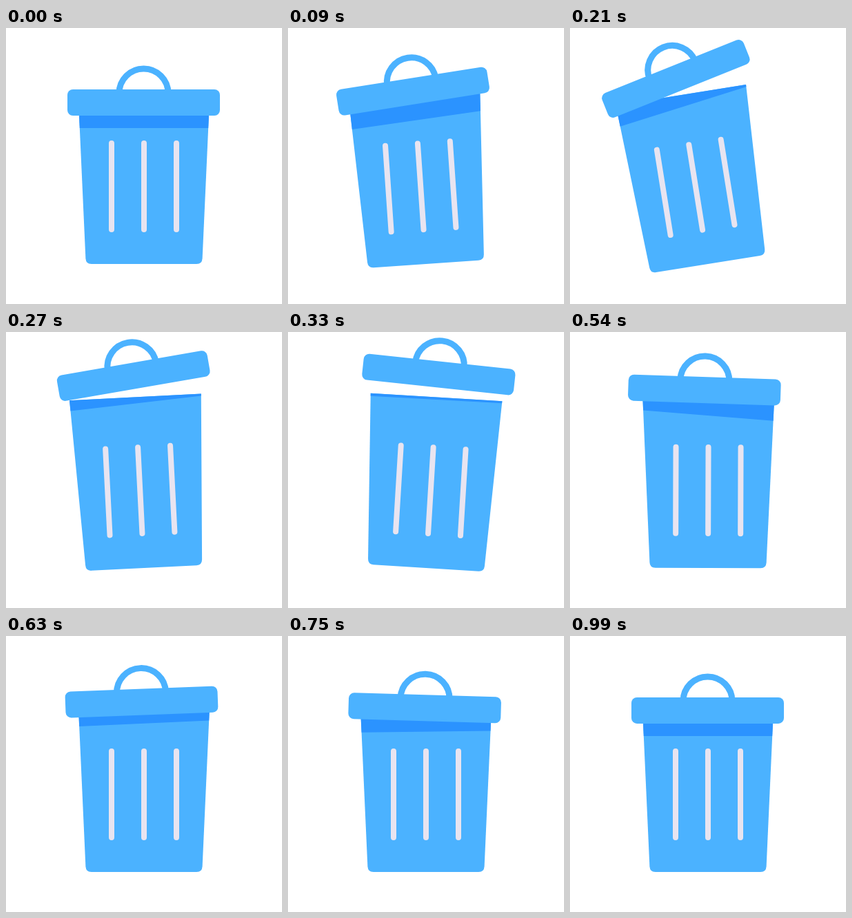
These frames come from a looping animation (400x400 px, 1.02 s). An HTML page:

```html
<!DOCTYPE html>
<html lang="en">
<head>
<meta charset="utf-8">
<title>Trash can</title>
<style>
  html, body { margin: 0; width: 100%; height: 100%; overflow: hidden; background: #fff; }
  svg { display: block; width: 100%; height: 100%; }
  .blue { fill: #4bb2ff; }
  .shade { fill: #2b93ff; }
  .slots { stroke: #e8e4f0; stroke-width: 8; stroke-linecap: round; }
  .handle { fill: none; stroke: #4bb2ff; stroke-width: 9; }
</style>
</head>
<body>
<svg viewBox="0 0 400 400">
  <g id="can">
    <path class="blue" d="M104.5 94H295.5L284.6 334Q284.2 342 276.2 342H123.8Q115.8 342 115.4 334Z"/>
    <path id="shade" class="shade"/>
    <path class="slots" d="M153 167V292M200 167V292M247 167V292"/>
    <g id="lid">
      <path class="handle" d="M-35.5 -13.5A35.5 35.5 0 0 1 35.5 -13.5"/>
      <rect class="blue" x="-110.5" y="-19" width="221" height="38" rx="8"/>
    </g>
  </g>
</svg>
<script>
const LOOP = 1020, STEP = 30, TOP = 94;
const byId = id => document.getElementById(id);
const can = byId('can'), lid = byId('lid'), shade = byId('shade');

// Leaves rest at 0 ms, passes the given [ms, value] points and is back at rest by end.
// Flat at turning points, smooth elsewhere.
function swing(rest, end, ...points) {
  const keys = [[0, rest], ...points, [end, rest]];
  const slope = i => (keys[i + 1][1] - keys[i][1]) / (keys[i + 1][0] - keys[i][0]);
  const tangent = keys.map((_, i) => {
    if (i === 0 || i === keys.length - 1) return 0;
    const a = slope(i - 1), b = slope(i);
    return a * b > 0 ? 2 * a * b / (a + b) : 0;
  });
  return t => {
    if (t >= end) return rest;
    const i = keys.findIndex(k => k[0] > t) - 1;
    const [t0, v0] = keys[i], [t1, v1] = keys[i + 1];
    const d = t1 - t0, u = (t - t0) / d, w = 1 - u;
    return v0 * (1 + 2 * u) * w * w + v1 * u * u * (3 - 2 * u)
      + d * u * w * (tangent[i] * w - tangent[i + 1] * u);
  };
}

const sway = swing(0, 570, [200, -9.3], [342, 3.75]);
const tilt = swing(0, 930, [210, -12.8], [330, 2.6], [440, 15.3], [590, -3], [740, 1.7]);
const shift = swing(0, 930, [210, -3], [330, 1.8], [460, -7], [630, -3]);
const left = swing(145, 900, [210, 125], [330, 98], [440, 98], [630, 131]);
const right = swing(145, 840, [210, 97.3], [330, 97], [450, 141], [600, 121.5]);

// The lid is tossed up quickly, then settles back softly.
const PEAK = 330;
const lift = t => 47 * (t < PEAK
  ? Math.sin(Math.PI / 2 * t / PEAK) ** 1.15
  : Math.exp(-(((t - PEAK) / 258) ** 1.9)));

const inset = y => (y - TOP) * 10.9 / 240;

function draw(now) {
  const t = Math.floor((now % LOOP + 0.5) / STEP) * STEP % LOOP;
  const l = left(t), r = right(t);
  can.setAttribute('transform', `rotate(${sway(t)} 200 342)`);
  lid.setAttribute('transform',
    `translate(${199.5 + shift(t)} ${108 - lift(t)}) rotate(${tilt(t)})`);
  shade.setAttribute('d',
    `M104.5 ${TOP}H295.5L${295.5 - inset(r)} ${r}L${104.5 + inset(l)} ${l}Z`);
}

function tick() {
  draw(performance.now());
  requestAnimationFrame(tick);
}
tick();
</script>
</body>
</html>
```
